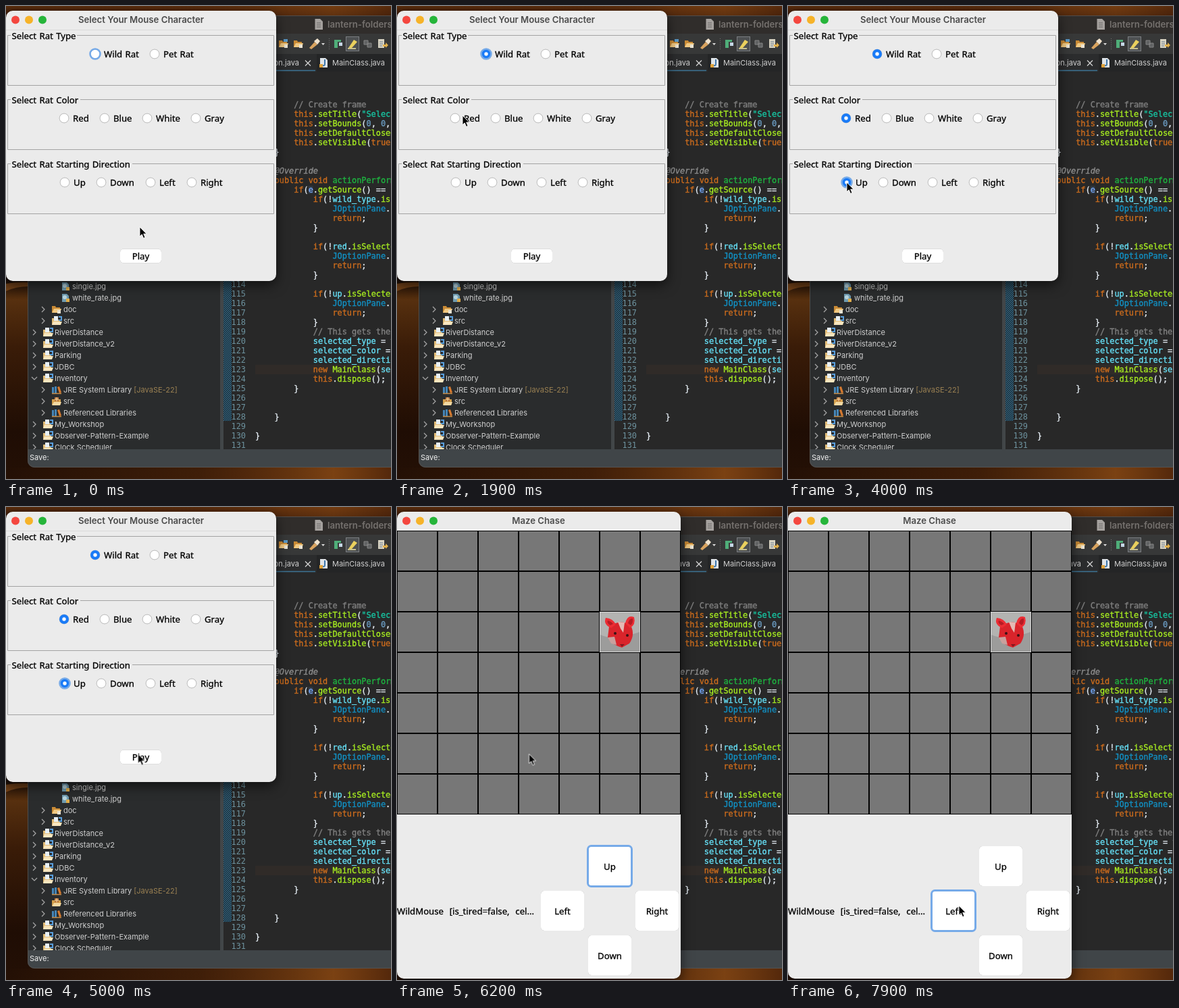
Animation of 570 by 700 pixels, one loop 8000 ms. Source, as an HTML page:

```html
<!DOCTYPE html>
<html lang="en">
<head>
<meta charset="utf-8">
<title>Character picker</title>
<style>
html, body { margin: 0; width: 100%; height: 100%; overflow: hidden; background: #1c0c04; }
svg { display: block; width: 570px; height: 700px; }
text { fill: currentColor; white-space: pre; }

.ide text { font: 11px Inter, sans-serif; color: #cfcfcf; }
.ide .heading { font-size: 13.2px; font-weight: 600; color: #75716e; }
.ide .code text { font: 11.88px "DejaVu Sans Mono", monospace; color: #e6eef5; stroke: currentColor; stroke-width: .35px; }
.ide .code .num { color: #6d929e; stroke: none; }
.note { color: #808080; }
.anno { color: #8f8f8f; font-style: italic; }
.key { color: #cc6c1d; }
.str { color: #17c6a3; }
.decl { color: #1eb540; }
.call { color: #a7ec21; }
.type { color: #1290c3; }
.field { color: #66e1f8; }
.arg { color: #79abff; }
.lit { color: #6897bb; }

.win { filter: drop-shadow(0 6px 9px #0009); }
.win text { font: 500 13.2px "Noto Sans", "Open Sans", sans-serif; word-spacing: .9px; color: #000; stroke: currentColor; stroke-width: .3px; }
.win .title { font: 600 13.2px Inter, sans-serif; word-spacing: 0; color: #4b4b4b; stroke: none; }
.mid { text-anchor: middle; }
.soft { filter: drop-shadow(0 .7px .7px #0006); }
.ring { fill: none; stroke: #76aae8; stroke-width: 3; }

.dialog, .game, .board, .pick, .focus, .upRing, .leftRing { animation: 8s step-end infinite; }
.dialog { animation-name: leave; }
.game { animation-name: enter; }
.board { animation-name: board; }
.wild { animation-name: wild; }
.red { animation-name: red; }
.up { animation-name: up; }
.focus { animation-name: focus; }
.upRing { animation-name: upRing; }
.leftRing { animation-name: leftRing; }
.cursor { animation: travel 8s ease-in-out infinite; }

@keyframes leave { 0% { opacity: 1 } 66.25%, to { opacity: 0 } }
@keyframes enter { 0% { opacity: 0 } 66.25%, to { opacity: 1 } }
@keyframes board { 0% { opacity: 0 } 70%, to { opacity: 1 } }
@keyframes wild { 0% { opacity: 0 } 13.75%, to { opacity: 1 } }
@keyframes red { 0% { opacity: 0 } 30%, to { opacity: 1 } }
@keyframes up { 0% { opacity: 0 } 50%, to { opacity: 1 } }
@keyframes upRing { 0% { opacity: 1 } 96.25%, to { opacity: 0 } }
@keyframes leftRing { 0% { opacity: 0 } 96.25%, to { opacity: 1 } }
@keyframes focus {
  0% { transform: translate(132px, 71px) }
  30% { transform: translate(86px, 166px) }
  50%, to { transform: translate(87px, 261px) }
}
@keyframes travel {
  0%, 3.75% { transform: translate(198px, 327px) }
  11.25%, 16.25% { transform: translate(132px, 71px) }
  22.5%, 23.75% { transform: translate(97px, 162px) }
  27.5%, 32.5% { transform: translate(87px, 166px) }
  38.75%, 42.5% { transform: translate(84px, 318px) }
  47.5%, 52.5% { transform: translate(87px, 261px) }
  60%, 80% { transform: translate(195.5px, 365.5px) }
  91.25%, to { transform: translate(253px, 590px) }
}
</style>
</head>
<body>
<svg viewBox="0 0 570 700">
  <defs>
    <linearGradient id="desert" x2="0" y2="1">
      <stop offset="0" stop-color="#5c2d0c"/>
      <stop offset=".02" stop-color="#35180a"/>
      <stop offset=".58" stop-color="#1a0c05"/>
      <stop offset=".62" stop-color="#57300f"/>
      <stop offset=".72" stop-color="#3a1c08"/>
      <stop offset=".9" stop-color="#1f0d04"/>
      <stop offset="1" stop-color="#241005"/>
    </linearGradient>
    <linearGradient id="dune">
      <stop offset="0" stop-color="#5a2c0c" stop-opacity="0"/>
      <stop offset=".5" stop-color="#5a2c0c" stop-opacity=".5"/>
      <stop offset=".85" stop-color="#8a4a15" stop-opacity=".85"/>
      <stop offset="1" stop-color="#54280b"/>
    </linearGradient>
    <pattern id="hatch" width="3" height="3" patternUnits="userSpaceOnUse">
      <rect width="3" height="3" fill="#1d303b"/>
      <path d="M-1 1L1-1M0 3L3 0M2 4L4 2" stroke="#3a7798" stroke-width="1"/>
    </pattern>
    <clipPath id="tree"><path d="M32 400H317V656H32Z"/></clipPath>
    <clipPath id="ideShape"><rect x="32" y="14" width="620" height="669" rx="10"/></clipPath>

    <g id="project">
      <path d="M-7-4H-2L-1-2H5V6H-7Z" fill="#e3bd78"/>
      <path d="M-5 1H8L6 6H-7Z" fill="#f8e6bf"/>
      <path d="M-4-7H2V0H-4Z" fill="#e8f0f6"/>
      <path d="M3-6H7V-1H3" fill="none" stroke="#5a9fdc" stroke-width="2"/>
    </g>
    <g id="folder">
      <path d="M-7-5H-2L-1-3H5V5H-7Z" fill="#c98a35"/>
      <path d="M-4-1H7L5 5H-7Z" fill="#f0c983"/>
      <path d="M1 1H6V6H1Z" fill="#e9e3d4"/>
    </g>
    <g id="package">
      <path d="M-7-3H6V5H-7Z" fill="#d4a04d"/>
      <path d="M-3-6H3V0H-3Z" fill="#b9743d"/>
      <path d="M0-6V0M-3-3H3" stroke="#f4dba8"/>
      <path d="M-4 1H7L5 6H-7Z" fill="#f3d9a4"/>
    </g>
    <g id="books">
      <path d="M-7-4H-4V5H-7ZM-3-5H0V5H-3Z" fill="#4586b8"/>
      <path d="M1-4L4-5 7 4 4 5Z" fill="#d5792f"/>
      <path d="M-7 5.5H7" stroke="#c98d45" stroke-width="1.5"/>
    </g>
    <g id="image">
      <path d="M-5-6H2L5-3V6H-5Z" fill="#6f9bb0"/>
      <circle cx="-1" cy="-1" r="3" fill="#b8d4de"/>
      <path d="M1 1H6V6H1Z" fill="#dfad4b"/>
    </g>
    <g id="lights">
      <circle cx="14" cy="20.5" r="6" fill="#f4473f"/>
      <circle cx="34" cy="20.5" r="6" fill="#f6b329"/>
      <circle cx="54" cy="20.5" r="6" fill="#26b53a"/>
    </g>
    <g id="dot">
      <circle r="7" fill="#1a7bf7"/>
      <circle r="2.7" fill="#fff"/>
    </g>
  </defs>

  <rect width="570" height="700" fill="url(#desert)"/>
  <path d="M0 0H570V14H0Z" fill="url(#dune)" opacity=".6"/>
  <path d="M0 683H570V700H0Z" fill="url(#dune)"/>
  <path d="M0 411Q18 408 33 409V415Q15 415 0 422Z" fill="#a96426" opacity=".5"/>

  <g class="ide">
    <g clip-path="url(#ideShape)">
      <path d="M32 14H570V683H32Z" fill="#282828"/>
      <path d="M32 14H570V41H32Z" fill="#302d2b"/>
      <path d="M32 41H570V71H32Z" fill="#373838"/>
      <path d="M32 71H570V97H32Z" fill="#242526"/>
      <path d="M32 71H460V97H32Z" fill="#2b2c2d"/>
      <path d="M32 95.5H458" stroke="#3c7394" stroke-width="1.5"/>
      <path d="M32 97H317V656H32Z" fill="#2a2c2d"/>
      <path d="M317 97H322V656H317Z" fill="#424648"/>
      <path d="M322 97H334V614H322Z" fill="url(#hatch)"/>
      <path d="M369 531H570V545H369Z" fill="#302b28"/>
      <path d="M32 656H570V683H32Z" fill="#404548"/>
    </g>
    <rect x="32.5" y="14.5" width="620" height="668" rx="10" fill="none" stroke="#5b5652" stroke-width=".8"/>

    <path d="M457.500 19H465L469 23V35H457.500Z" fill="#a5a19e"/>
    <path d="M460 25H466M460 28H466M460 31H466" stroke="#6b6866"/>
    <text class="heading" x="476" y="32">lantern-folders</text>

    <use href="#folder" x="411" y="56"/>
    <path d="M411 49H417V53H411Z" fill="#5796c5"/>
    <use href="#folder" x="433" y="56"/>
    <path d="M449 62L457 53 461 57 452 64Z" fill="#d9a35e"/>
    <path d="M456 52L461 48 465 52 461 57Z" fill="#efe2cd"/>
    <path d="M467 55H472L469.500 58Z" fill="#ddd"/>
    <path d="M478.500 48V65" stroke="#777" stroke-dasharray="1 2"/>
    <path d="M486 50H496V53H491V62H486Z" fill="#4fae79"/>
    <path d="M493 54H498V59H493Z" fill="#c5d6e6"/>
    <rect x="503.500" y="45.500" width="19" height="21" fill="#4d5052" stroke="#7b7e81"/>
    <path d="M507 62L515 50 520 53 512 62Z" fill="#ead05d"/>
    <path d="M506 63H518" stroke="#f2e6a2" stroke-width="1.5"/>
    <path d="M530 51H536V57H530ZM535 55H541V61H535Z" fill="#606263" stroke="#858585"/>
    <path d="M551 49H560V62H551Z" fill="#d8d3c2"/>
    <path d="M553 53H558M553 56H558M553 59H557" stroke="#6b7d90"/>
    <path d="M558 57H562V54L566 58 562 62V60H558Z" fill="#e2b04b"/>

    <text x="434" y="88" text-anchor="end">Selection.java</text>
    <path d="M443 80.500L451 88.500M451 80.500L443 88.500" stroke="#d5d5d5" stroke-width="1.2"/>
    <path d="M465 77H473L476 80V91H465Z" fill="#dfe4e8"/>
    <path d="M472 79V86Q472 89 468 88" fill="none" stroke="#3f78ae" stroke-width="2"/>
    <path d="M464 86H469V91H464Z" fill="#e0a33c"/>
    <text x="483" y="88">MainClass.java</text>
    <g id="rows" clip-path="url(#tree)"></g>
    <g id="code" class="code"></g>
    <text x="35" y="672" style="color:#f0f0f0">Save:</text>
  </g>

  <g class="dialog">
    <g class="win">
      <rect y="7" width="400" height="400" rx="10" fill="#ebebeb"/>
      <path d="M0 35.500H400" stroke="#dadada"/>
      <use href="#lights"/>
      <text class="title mid" x="200" y="25">Select Your Mouse Character</text>
      <g id="panels"></g>
      <rect class="soft" x="169" y="359.500" width="61" height="21" rx="5" fill="#fff"/>
      <text class="mid" x="199.500" y="374.500">Play</text>
    </g>
    <use class="pick wild" href="#dot" x="132" y="71"/>
    <use class="pick red" href="#dot" x="86" y="166"/>
    <use class="pick up" href="#dot" x="87" y="261"/>
    <circle class="ring focus" r="7.500" style="stroke-width:2.6"/>
  </g>

  <g class="game">
    <g class="win">
      <rect y="7" width="420" height="691" rx="10" fill="#ebebeb"/>
      <path d="M0 35.500H420" stroke="#cfcfcf"/>
      <use href="#lights"/>
      <text class="title mid" x="209.500" y="25">Maze Chase</text>
      <g class="board">
        <g id="cells" fill="#777" stroke="#000"></g>
        <g transform="translate(300 155)">
          <path d="M0 0H60V60H0Z" fill="#b3b3b1"/>
          <path d="M1 34Q20 44 59 30V59H1Z" fill="#9c9c9b"/>
          <path d="M14 22Q30 10 46 20Q53 34 44 47L33 53Q20 50 12 38Z" fill="#d9242b"/>
          <path d="M17 24Q5 19 9 9Q20 10 24 19ZM38 17Q41 4 51 8Q54 19 45 24Z" fill="#ec2d34"/>
          <path d="M16 20Q10 17 12 13Q17 14 20 18ZM42 17Q44 9 49 10Q50 17 46 20Z" fill="#b51c24"/>
          <path d="M27 15L37 16 35 31 31 25Z" fill="#e5b9b4"/>
          <path d="M12 38L22 37 25 49 17 47Z" fill="#c9a09d"/>
          <ellipse cx="23" cy="32" rx="2" ry="2" fill="#391216"/>
          <ellipse cx="41" cy="35" rx="2" ry="2" fill="#391216"/>
          <path d="M30 48L37 48 33 52Z" fill="#841820"/>
          <path d="M.5.500H59.500V59.500H.5Z" fill="none" stroke="#d6d6d6"/>
        </g>
        <text x="0" y="603">WildMouse&#160; [is_tired=false,&#160; cel...</text>
        <g id="pad"></g>
        <rect class="ring upRing" x="282.500" y="501.500" width="65" height="60" rx="5"/>
        <rect class="ring leftRing" x="212.500" y="567.500" width="65" height="60" rx="5"/>
      </g>
    </g>
  </g>

  <path class="cursor" d="M0 0V14L3.200 11 5.600 16.600 8 15.500 5.700 10.200H10Z" fill="#000" stroke="#fff" stroke-width=".9"/>
</svg>

<script>
const fill = (id, html) => { document.getElementById(id).innerHTML = html; };

// Project tree: depth, icon, label, note, open
const rows = [
  [2, 'image', 'single.jpg'], [2, 'image', 'white_rate.jpg'],
  [1, 'folder', 'doc'], [1, 'project', 'src'],
  [0, 'project', 'RiverDistance'], [0, 'project', 'RiverDistance_v2'],
  [0, 'project', 'Parking'], [0, 'project', 'JDBC'],
  [0, 'project', 'Inventory', '', true],
  [1, 'books', 'JRE System Library', ' [JavaSE-22]'],
  [1, 'package', 'src'], [1, 'books', 'Referenced Libraries'],
  [0, 'project', 'My_Workshop'], [0, 'project', 'Observer-Pattern-Example'],
  [0, 'project', 'Clock Scheduler']
];
fill('rows', rows.map(([depth, icon, label, note = '', open], i) => {
  const x = 62 + depth * 13, y = 415 + i * 17;
  const chevron = open ? 'm-4-2l4 4 4-4' : 'm-2-4l4 4-4 4';
  const arrow = depth < 2
    ? `<path d="M${x - 20} ${y}${chevron}" fill="none" stroke="#a8a8a8" stroke-width="1.2"/>` : '';
  return `${arrow}<use href="#${icon}" x="${x}" y="${y}"/>
    <text x="${x + 10}" y="${y + 4}">${label}<tspan style="color:#9a8052">${note}</tspan></text>`;
}).join(''));

// Editor: each leading tab is one indent of four columns
const check = (cond) => `\t\t\tif(!${cond}.isSelected() &&
\t\t\t\tJOptionPane.showMessageDialog(
\t\t\t\treturn;
\t\t\t}

`;
const source = `\t\t// Create frame
\t\tthis.setTitle("Select Your"
\t\tthis.setBounds(0, 0, 400,
\t\tthis.setDefaultCloseOperation(
\t\tthis.setVisible(true);
\t}

\t@Override
\tpublic void actionPerformed(
\t\tif(e.getSource() == play) {
${check('wild_type')}${check('red')}${check('up').trimEnd()}
\t\t\t// This gets the selected
\t\t\tselected_type = type;
\t\t\tselected_color = color;
\t\t\tselected_direction = dir;
\t\t\tnew MainClass(selected_type
\t\t\tthis.dispose();
\t\t}


\t}

}`;
const kinds = ['note', 'str', 'anno', 'key', 'decl', 'call', 'type', 'field', 'arg', 'lit'];
const token = /(\/\/.*)|("[^"]*")|(@\w+)|\b(this|public|void|if|return|new|true)\b|(actionPerformed)|(\w+)(?=\()|(JOptionPane)|\b(selected_\w+|wild_type|red|up)\b|\b(e)\b|\b(\d+)\b/g;
const paint = (line) => line.replace(/&/g, '&amp;').replace(token, (word, ...groups) =>
  `<tspan class="${kinds[groups.findIndex((g, i) => i < kinds.length && g !== undefined)]}">${word}</tspan>`);

let code = '<rect x="447.5" y="266" width="7" height="12" fill="#2e363e"/>';
source.split('\n').forEach((line, i) => {
  const indent = line.match(/^\t*/)[0].length;
  code += `<text x="${369 + indent * 28.6}" y="${150 + i * 14}">${paint(line.slice(indent))}</text>`;
});
for (let n = 112; n <= 131; n++) {
  code += `<text class="num" x="355" y="${416 + (n - 114) * 14}" text-anchor="end">${n}</text>`;
}
fill('code', code);

// Option panels: title, title width, then label and radio centre
const panels = [
  ['Select Rat Type', 98, ['Wild Rat', 132], ['Pet Rat', 220]],
  ['Select Rat Color', 103, ['Red', 86], ['Blue', 146], ['White', 209], ['Gray', 281]],
  ['Select Rat Starting Direction', 180, ['Up', 87], ['Down', 141], ['Left', 214], ['Right', 275]]
];
fill('panels', panels.map(([title, width, ...options], i) => {
  const y = 43.5 + i * 95;
  return `<path d="M7 ${y}H2.500V${y + 74}H396.500V${y}H${7 + width}" fill="none" stroke="#a3a3a3"/>
    <text x="8.500" y="${y + 5}">${title}</text>` + options.map(([label, x]) =>
    `<circle class="soft" cx="${x}" cy="${y + 27.5}" r="6.800" fill="#fff" stroke="#c2c2c2" stroke-width=".7"/>
     <text x="${x + 13}" y="${y + 32.5}">${label}</text>`).join('');
}).join(''));

let cells = '';
for (let i = 0; i < 49; i++) {
  cells += `<rect x="${i % 7 * 60 + .5}" y="${Math.floor(i / 7) * 60 + 35.5}" width="59" height="59"/>`;
}
fill('cells', cells);

fill('pad', [['Up', 283, 502], ['Left', 213, 568], ['Right', 353, 568], ['Down', 283, 634]]
  .map(([label, x, y]) => `<rect class="soft" x="${x}" y="${y}" width="64" height="59" rx="5" fill="#fff"/>
    <text class="mid" x="${x + 32}" y="${y + 34.5}">${label}</text>`).join(''));
</script>
</body>
</html>
```
